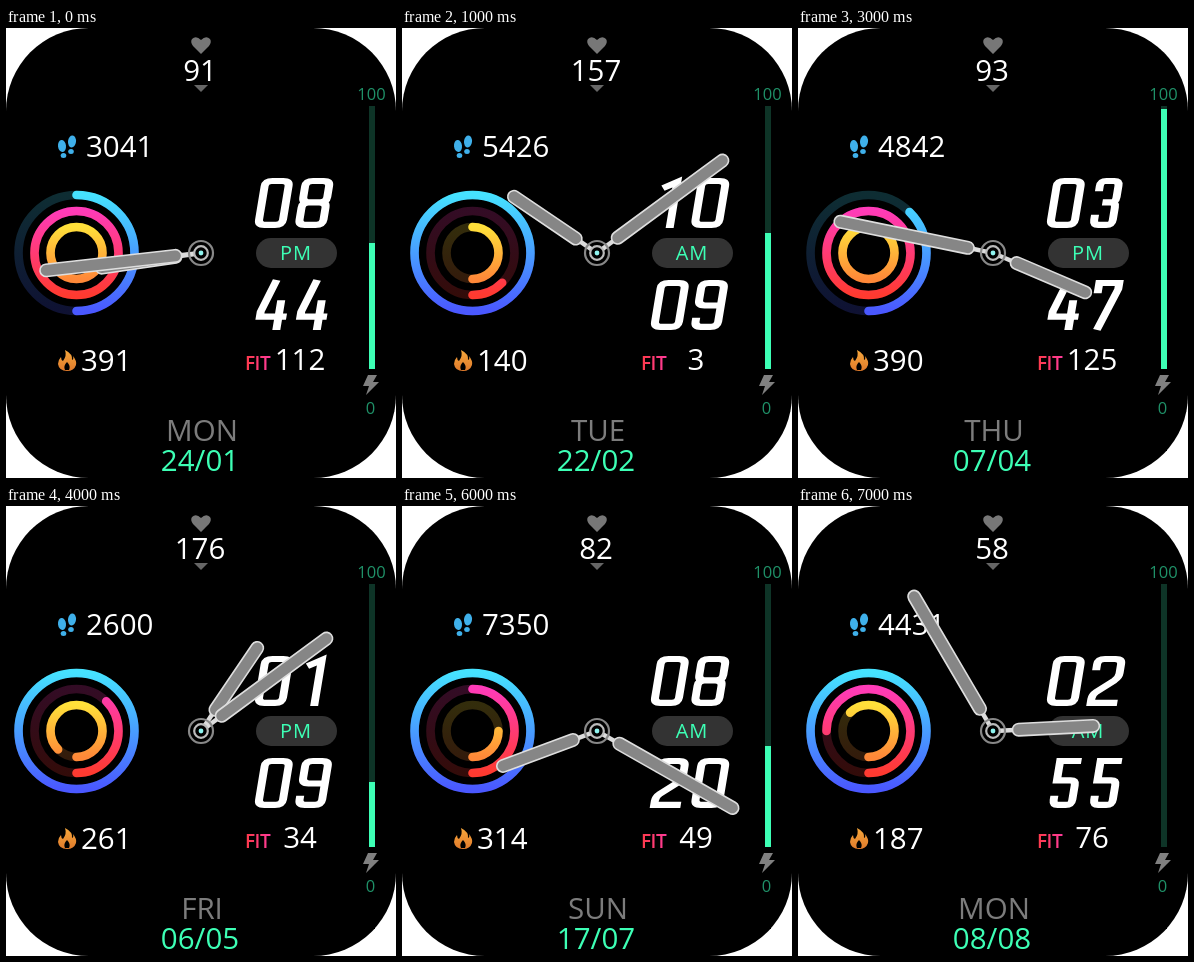
Animation, 390 px wide and 450 px high, one loop 8 s. Source, as an HTML page:

```html
<!DOCTYPE html>
<html lang="en">
<head>
<meta charset="utf-8">
<title>Watch face</title>
<style>
  html, body { margin: 0; height: 100%; overflow: hidden; background: #fff; }
  svg { display: block; width: 390px; height: 450px; }
  text { font: 500 29.5px "Open Sans", "Noto Sans", sans-serif; fill: #fff; }
  .mid { text-anchor: middle; }
  .mint { fill: #3dffb5; }
  .scale { font-size: 16.5px; fill: #1f9168; text-anchor: middle; }
  .track { opacity: .2; }
  .ring { fill: none; stroke-width: 8.6; stroke-linecap: round; }
  .digits path { fill: none; stroke: #fff; stroke-width: 6; }
  .capsule { fill: #868686; stroke: #dedede; stroke-width: 1.6; }
</style>
</head>
<body>
<svg viewBox="0 0 390 450">
  <defs id="defs"></defs>
  <rect width="390" height="450" rx="83"/>

  <path fill="#777" d="M195 26L187 18Q184 14 186 11Q190 7 195 12Q200 7 204 11Q206 14 203 18Z"/>
  <text id="pulse" class="mid" x="194" y="53"/>
  <path fill="#666" d="M188 57H202L195 64Z"/>

  <g fill="#3fb0ea">
    <ellipse cx="56" cy="118" rx="4" ry="6" transform="rotate(-6 56 118)"/>
    <ellipse cx="57.5" cy="127.5" rx="2.8" ry="2.5"/>
    <ellipse cx="66" cy="113.5" rx="4" ry="6" transform="rotate(6 66 113.5)"/>
    <ellipse cx="65" cy="123.5" rx="2.8" ry="2.5"/>
  </g>
  <text id="steps" x="80" y="129"/>

  <path fill="url(#flame)" d="M59 322Q67 326 66 332Q68 331 67 328Q71 333 70 337Q68 343 61 343Q53 343 52 336Q52 332 55 329Q55 332 57 333Q61 328 59 322Z"/>
  <path d="M61 334Q65 338 63 342H59Q57 338 61 334Z"/>
  <text id="energy" x="75" y="342.5"/>

  <text x="239" y="342" style="font-size:19px;font-weight:600;letter-spacing:-.5px;fill:url(#label)">FIT</text>
  <text id="score" class="mid" x="294" y="342"/>

  <g id="rings"></g>

  <g id="hours" class="digits" transform="translate(247 150)"></g>
  <g id="minutes" class="digits" transform="translate(247 252)"></g>
  <rect x="250" y="210" width="81" height="30" rx="15" fill="#333"/>
  <text id="half" class="mid mint" x="290" y="232" style="font-size:20px;letter-spacing:1px"/>

  <text class="scale" x="365.5" y="72">100</text>
  <rect x="363" y="78" width="6" height="263" fill="#0e3427"/>
  <rect id="battery" class="mint" x="363" width="6"/>
  <path fill="#808080" d="M362 347H371L367 354H373L360 367L363 358H357Z"/>
  <text class="scale" x="364.5" y="386">0</text>

  <text id="day" class="mid" x="196" y="413" style="fill:#7c7c7c"/>
  <text id="date" class="mid mint" x="194" y="443"/>

  <g id="hands"></g>
  <g fill="none" stroke="#888" stroke-width="2.2">
    <circle cx="195" cy="225" r="12"/>
    <circle cx="195" cy="225" r="6.8" fill="#000" stroke="#bbb"/>
  </g>
  <circle cx="195" cy="225" r="2.4" fill="#8ff5f0"/>
</svg>
<script>
const $ = id => document.getElementById(id);

// Centre lines of the clock digits in an 18 x 43 box
const glyphs = {
  0: 'M5 0H13Q18 0 18 5V38Q18 43 13 43H5Q0 43 0 38V5Q0 0 5 0Z',
  1: 'M2 7L12 1V46',
  2: 'M0 11V5Q0 0 5 0H13Q18 0 18 5V14Q18 18 15 21L3 32Q0 35 0 39V43H20',
  3: 'M2 10V5Q2 0 6 0H12Q16 0 16 5V16Q16 21 12 21H6M12 21Q16 21 16 26V38Q16 43 12 43H6Q2 43 2 38V33',
  4: 'M8 -3L0 28V33H20M14 17V46',
  5: 'M18 0H2V19H12Q16 19 16 24V38Q16 43 12 43H6Q2 43 2 38V34',
  7: 'M1 10V0H16V6L5 46',
  8: 'M5 0H13Q18 0 18 5V16Q18 21 13 21H5Q0 21 0 16V5Q0 0 5 0ZM5 21H13Q18 21 18 26V38Q18 43 13 43H5Q0 43 0 38V26Q0 21 5 21Z',
  9: 'M17 22H5Q0 22 0 17V5Q0 0 5 0H12Q17 0 17 5V38Q17 43 12 43H5Q0 43 0 38V34'
};

// pulse, steps, energy, score, time, battery top, day, date, ring eighths
const states = [
  [91, 3041, 391, 112, '08:44 PM', 215, 'MON', '24/01', [4, 8, 8]],
  [157, 5426, 140, 3, '10:09 AM', 205, 'TUE', '22/02', [8, 1, 4]],
  [124, 3718, 275, 58, '09:25 AM', 178, 'WED', '23/03', [2, 5, 6]],
  [93, 4842, 390, 125, '03:47 PM', 81, 'THU', '07/04', [3, 8, 8]],
  [176, 2600, 261, 34, '01:09 PM', 276, 'FRI', '06/05', [8, 3, 7]],
  [156, 11289, 128, 87, '02:37 PM', 144, 'SAT', '25/06', [8, 7, 3]],
  [82, 7350, 314, 49, '08:20 AM', 240, 'SUN', '17/07', [8, 4, 2]],
  [58, 4431, 187, 76, '02:55 AM', 341, 'MON', '08/08', [8, 6, 5]]
];

const rings = [
  { r: 58, from: '#46e2ff', to: '#4a58ff' },
  { r: 42, from: '#ff3bb8', to: '#ff3a30' },
  { r: 26, from: '#ffe03a', to: '#ff8838' }
];

const gradient = (id, from, to, axis = 'x1="0" y1="0" x2="0" y2="1"') =>
  `<linearGradient id="${id}" ${axis}><stop stop-color="${from}"/><stop offset="1" stop-color="${to}"/></linearGradient>`;

$('defs').innerHTML = gradient('flame', '#f7a83c', '#e07a2b') +
  gradient('label', '#ff3a48', '#ff3b9c', '') +
  rings.map((ring, i) => gradient('ring' + i, ring.from, ring.to)).join('');

// Rings fill from the bottom, counterclockwise
function drawRing({ r }, i, eighths) {
  const arc = `d="M70.5 ${225 + r}a${r} ${r} 0 0 0 0 ${-2 * r}a${r} ${r} 0 0 0 0 ${2 * r}" class="ring`;
  return `<path ${arc} track" stroke="url(#ring${i})"/>
    <path ${arc}" stroke="url(#ring${i})" pathLength="8" stroke-dasharray="${eighths} 16"/>`;
}

const drawDigits = pair => [...pair].map((digit, i) =>
  `<path d="${glyphs[digit]}" transform="matrix(1.33 0 -.17 1.02 ${12.5 + i * 40.5} 3)"/>`).join('');

// The hands sit slightly behind the exact angle
const drawHand = (angle, tip) => `<g transform="translate(195 225) rotate(${angle - .4})">
  <path d="M0 -7V-21" stroke="#dcdcdc" stroke-width="4.5"/>
  <rect class="capsule" x="-6.2" y="${-tip}" width="12.4" height="${tip - 19.5}" rx="6.2"/></g>`;

function show([pulse, steps, energy, score, time, top, day, date, levels]) {
  const [hours, minutes, half] = time.split(/[: ]/);
  const labels = { pulse, steps, energy, score, half, day, date };
  for (const id in labels) $(id).textContent = labels[id];
  $('hours').innerHTML = drawDigits(hours);
  $('minutes').innerHTML = drawDigits(minutes);
  $('battery').setAttribute('y', top);
  $('battery').setAttribute('height', 341 - top);
  $('rings').innerHTML = rings.map((ring, i) => drawRing(ring, i, levels[i])).join('');
  $('hands').innerHTML = drawHand(hours * 30 + minutes / 2, 106.5) + drawHand(minutes * 6, 162);
}

let shown = -1;
function tick() {
  const index = Math.floor(performance.now() / 1000) % states.length;
  if (index !== shown) show(states[shown = index]);
  requestAnimationFrame(tick);
}
tick();
</script>
</body>
</html>
```
